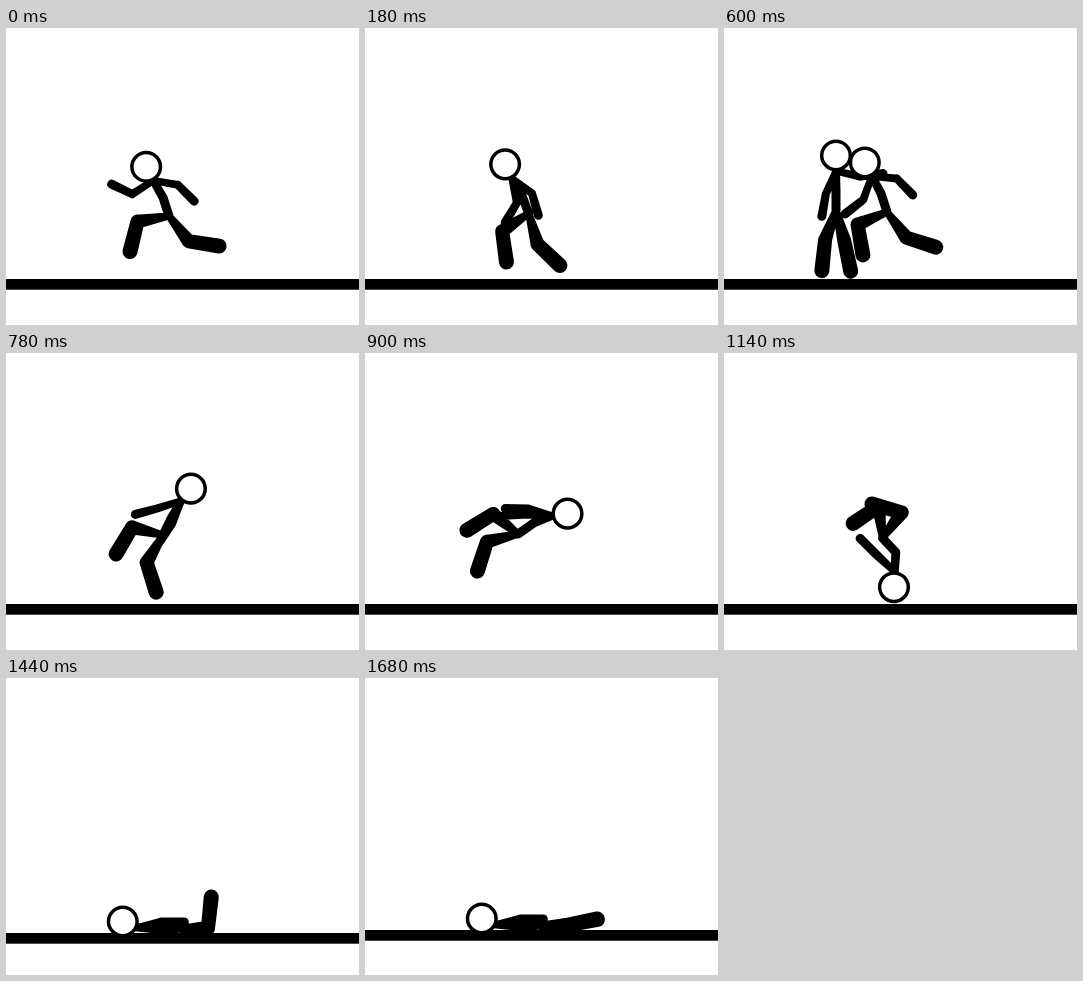
These frames come from a looping animation (353 px wide and 297 px high, 1.74 s). An HTML page:

```html
<!DOCTYPE html>
<html lang="en">
<head>
<meta charset="utf-8">
<title>Stick runner</title>
<style>
html, body { margin: 0; width: 100%; height: 100%; overflow: hidden; background: #fff; }
svg { display: block; width: 353px; height: 297px; }
</style>
</head>
<body>
<svg viewBox="0 0 353 297">
  <rect id="ground" x="0" y="251" width="353" height="10.7"/>
  <g id="rival"><path/><circle r="14.3" fill="#fff" stroke="#000" stroke-width="3.5"/></g>
  <g id="runner"><path/><circle r="14.3" fill="#fff" stroke="#000" stroke-width="3.5"/></g>
</svg>
<script>
const STEP = 60, STEPS = 29;
const BONE = { spine: 19.5, neck: 15.5, upperArm: 25, foreArm: 23, thigh: 32, shin: 31 };

// Hip x, y, then absolute bone angles in degrees:
// lower spine, upper spine, neck, arm A (2), arm B (2), leg A (2), leg B (2)
const stride = [163, 188, -108, -120, -117, 147, -154, 10, 45, 170, 104, 52, 9];
const pass   = [164, 184, -112, -121, -115, 44, 78, 50, 88, 134, 71, 85, 61];
const hit    = [163, 184, -108, -118, -117, 110, 142, 5, 46, 157, 80, 53, 18];
const fly    = [153, 181, -35, -21, -8, 197, 180, 183, 178, 219, 148, 166, 108];
const dive   = [158.5, 185, 47, 93, 93, 224, 224, 222, 226, 307, 196, 263, 146];
const lie    = [170, 249, 180, 184, 203, -14, 1, -8, 4, -2, -84, -1, -84];
const stand  = [112, 182, -90, -90, -90, 114, 100, 80, 70, 110, 96, 75, 78];

const swap = ([x, y, s1, s2, n, a1, a2, b1, b2, c1, c2, d1, d2]) =>
  [x, y, s1, s2, n, b1, b2, a1, a2, d1, d2, c1, c2];

const bendShins = angle => lie.map((v, i) => i === 10 || i === 12 ? angle : v);

const keys = [
  [0, stride], [2, swap(pass)], [5, swap(stride)], [7, pass], [10, hit],
  [15, fly], [19, dive], [23, lie], [24, lie],
  [26, bendShins(-60)], [28, bendShins(-11)]
];

const rad = deg => deg * Math.PI / 180;
const lerp = (a, b, k) => a + (b - a) * k;
const turn = (a, b, k) => a + (b - a - 360 * Math.round((b - a) / 360)) * k;

function poseAt(f) {
  let i = 0;
  while (i < keys.length - 2 && keys[i + 1][0] <= f) i++;
  const [[f0, a], [f1, b]] = [keys[i], keys[i + 1]];
  const k = (f - f0) / (f1 - f0);
  return a.map((v, j) => (j < 2 ? lerp : turn)(v, b[j], k));
}

const reach = ([x, y], deg, len) =>
  [x + len * Math.cos(rad(deg)), y + len * Math.sin(rad(deg))];

// Tapered bone with round ends
function limb(p, q, r, s) {
  const a = Math.atan2(q[1] - p[1], q[0] - p[0]) + Math.PI / 2;
  const c = Math.cos(a), n = Math.sin(a);
  const at = (o, d) => (o[0] + d * c).toFixed(2) + ' ' + (o[1] + d * n).toFixed(2);
  return `M${at(p, r)}A${r} ${r} 0 0 1 ${at(p, -r)}L${at(q, -s)}A${s} ${s} 0 0 1 ${at(q, s)}Z`;
}

function drawFigure(g, pose, dy = 0) {
  const [x, y, s1, s2, n, a1, a2, b1, b2, c1, c2, d1, d2] = pose;
  const hip = [x, y];
  const mid = reach(hip, s1, BONE.spine);
  const neck = reach(mid, s2, BONE.spine);
  const head = reach(neck, n, BONE.neck);
  const arm = (u, v) => {
    const elbow = reach(neck, u, BONE.upperArm);
    return limb(neck, elbow, 3.5, 4) + limb(elbow, reach(elbow, v, BONE.foreArm), 4, 4.5);
  };
  const leg = (u, v) => {
    const knee = reach(hip, u, BONE.thigh);
    return limb(hip, knee, 3.5, 7) + limb(knee, reach(knee, v, BONE.shin), 7, 7.5);
  };
  g.children[0].setAttribute('d',
    limb(hip, mid, 4.5, 4.5) + limb(mid, neck, 4.5, 4) +
    arm(a1, a2) + arm(b1, b2) + leg(c1, c2) + leg(d1, d2));
  g.children[1].setAttribute('cx', head[0]);
  g.children[1].setAttribute('cy', head[1]);
  // Keep the head from sinking into the floor
  const lift = Math.max(0, head[1] - 239.5);
  g.setAttribute('transform', `translate(0 ${dy - lift})`);
}

const [ground, rival, runner] = ['ground', 'rival', 'runner'].map(id => document.getElementById(id));

function render(ms) {
  const f = Math.floor(ms / STEP) % STEPS;
  const shake = f < 22 ? 0 : 5.8 - 0.8 * (f - 22);
  ground.setAttribute('y', 251 + Math.round(shake));
  drawFigure(runner, poseAt(f), Math.round(shake));

  const met = f >= 8 && f <= 12;
  rival.setAttribute('visibility', met ? 'visible' : 'hidden');
  if (met) {
    const k = Math.min(1, (f - 8) / 2);
    const pose = stand.slice();
    pose[0] += 15 * (f - 10);
    pose[1] += 2 * (1 - k);
    pose[7] = lerp(80, 13, k);
    pose[8] = lerp(70, -8, k);
    drawFigure(rival, pose);
  }
}

const start = performance.now();
function tick() {
  render(performance.now() - start);
  requestAnimationFrame(tick);
}
tick();
</script>
</body>
</html>
```
